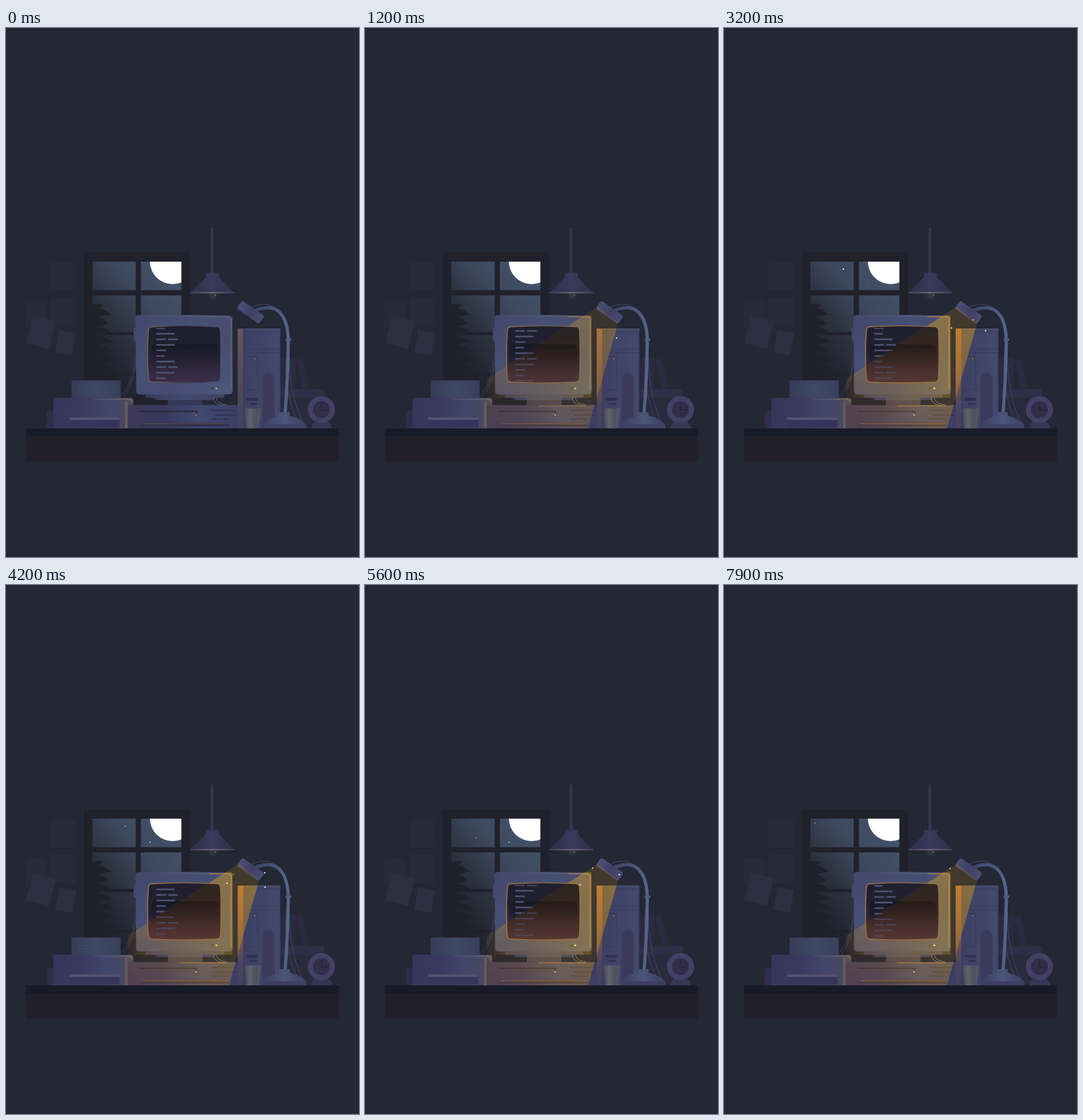
An HTML page that plays this animation: 611x917 px, repeating every 8000 ms.

```html
<!DOCTYPE html>
<html lang="en">
<head>
<meta charset="utf-8">
<title>Night desk</title>
<style>
html, body { margin: 0; height: 100%; overflow: hidden; background: #242734; }
svg { display: block; width: 100vw; height: 100vh; }
</style>
</head>
<body>
<svg viewBox="0 0 611 917" preserveAspectRatio="none">
<defs id="defs">
  <clipPath id="opening"><rect x="149.500" y="405" width="154" height="235"/></clipPath>
  <clipPath id="screenClip"><rect x="247" y="520" width="123" height="92.500"/></clipPath>
  <clipPath id="coneClip"><use href="#cone"/></clipPath>
  <clipPath id="objects"><path d="M224 498H392V641H340V654H400V694H211V654H280V641H224zM401 521H475V694H401z"/></clipPath>
  <path id="screen" d="M252 518Q308 514.500 365 518Q370.500 518.500 371 524Q373 566 371 607Q370.500 612.500 365 613.500Q308 616.500 252 613.500Q247 613 246.500 607Q243.500 566 246.500 524Q247 518.500 252 518Z"/>
  <path id="cone" d="M403 483L438 512L386 694H211V608L224 599.500Z"/>
  <path id="leads" d="M359 641C360 650 366 653 377 655M364 641C366 649 371 652 382 653"/>
</defs>

<rect width="611" height="917" fill="#242734"/>

<g id="papers" fill="#282a3a">
  <rect x="77" y="405.500" width="44.500" height="49.500"/>
  <rect x="77" y="467" width="44.500" height="50"/>
  <rect x="34" y="473" width="36.500" height="47"/>
  <rect x="40" y="503" width="41" height="49" fill="#2d2f40" transform="rotate(14 61 528)"/>
  <rect x="88.500" y="526" width="30" height="40" fill="#2d2f40" transform="rotate(10 104 546)"/>
</g>

<g id="window">
  <rect x="135" y="389" width="183.500" height="305" fill="#20212b"/>
  <g clip-path="url(#opening)">
    <rect x="149" y="404" width="155" height="236" fill="url(#sky)"/>
    <path id="tree" fill="#20212b"/>
    <circle cx="288.500" cy="404.500" r="39.500" fill="#fff"/>
    <path d="M229 404V640M149 459H304" stroke="#20212b" stroke-width="9"/>
    <path d="M149 529.700H304M149 600.500H304" stroke="#20212b" stroke-width="5.500"/>
  </g>
</g>
<g id="stars" fill="#fff"></g>

<g id="pendant">
  <circle cx="357.500" cy="459" r="12" fill="#2a2c39"/>
  <circle cx="358" cy="462" r="6" fill="#343744"/>
  <circle cx="362.500" cy="463" r="1" fill="#8b8a80"/>
  <rect x="354" y="346" width="5" height="80" fill="#363354"/>
  <path d="M346 424.500H368.500V432L395 459H319L346 432z" fill="url(#shade)"/>
  <rect x="319" y="457.500" width="76.500" height="2.500" fill="url(#rim)"/>
</g>

<g id="books" fill="#2b2a3e">
  <rect x="475" y="640" width="75" height="54" fill="#292a3b"/>
  <rect x="475" y="571.500" width="26.500" height="55"/>
  <rect x="508" y="573" width="12" height="53" transform="rotate(-14 514 600)"/>
  <rect x="475" y="626" width="75.500" height="15" fill="#2f2e46"/>
</g>

<g id="clock">
  <path d="M536 681H556L564 689V694H529V689z" fill="#363654"/>
  <circle cx="546" cy="661.500" r="23.500" fill="#434065"/>
  <circle cx="546" cy="661.500" r="14.700" fill="#322d49"/>
  <path d="M546 650V662H558" fill="none" stroke="#24233a" stroke-width="1.300"/>
</g>

<path id="cables" d="M224 566C222 600 213 622 198 640M225 578C222 608 214 626 203 641" fill="none" stroke="#41455f"/>

<g id="printer">
  <rect x="70.500" y="664" width="20" height="30" rx="4" fill="#302d4a"/>
  <rect x="113.500" y="611" width="85" height="31" fill="url(#tray)"/>
  <path d="M124 619H187M124 625H187M124 631H187" stroke="#47546d" opacity=".5"/>
  <path d="M82 694V645Q82 641 86 641H216Q220.500 641 220.500 646V694z" fill="url(#printerBody)"/>
  <path d="M150 643.500H213Q218 643.500 218 649" fill="none" stroke="url(#edge)" stroke-width="1.500"/>
  <rect x="206" y="646" width="4.500" height="48" fill="#766257" opacity=".7"/>
  <rect x="109.500" y="675" width="87" height="17.500" fill="#36345a"/>
  <rect x="109.500" y="675" width="87" height="4.500" fill="#55516f"/>
</g>

<g id="case">
  <rect x="211" y="653.500" width="191" height="44" rx="4" fill="url(#caseBody)"/>
  <path d="M215 655H384" stroke="url(#edge)" stroke-width="1.300"/>
  <path d="M231 664.500H330V669" fill="none" stroke="#24243a" stroke-width="2"/>
  <path d="M355 663H397M362 671H397M355 678H384" stroke="#303252" stroke-width="1.800"/>
  <circle cx="329" cy="670.800" r="1.300" fill="#c08a53"/>
  <path d="M236 684.500H383L388 691H231z" fill="#33314f"/>
  <path d="M236 686H384" stroke="#65525a"/>
</g>

<g id="monitor">
  <path d="M280 643H340V654H280z" fill="#353858"/>
  <path d="M242 634H378V641H364L358 645H262L256 641H242z" fill="url(#foot)"/>
  <use href="#leads" fill="none" stroke="#6d6c78"/>
  <rect x="221" y="519" width="6" height="23.500" rx="2" fill="#414768"/>
  <path d="M229 497.500Q308 496 387 498.500Q392 499 392 504L392.500 629Q392.500 634.500 387 635H231Q226 635 225.500 630L224 503Q224 498 229 497.500z" fill="url(#shell)"/>
  <path d="M230 500Q308 498.500 385 501Q389.500 501.500 389.500 506V626" fill="none" stroke="url(#edge)"/>
  <use href="#screen" fill="url(#glass)" stroke="url(#bezel)" stroke-width="1.600"/>
  <rect x="251" y="548.500" width="117" height="48" rx="8" fill="url(#reflect)"/>
  <g id="lines" clip-path="url(#screenClip)"></g>
  <circle cx="357.500" cy="624.500" r="1.400" fill="#25273c"/>
  <circle cx="364" cy="624.500" r="1.600" fill="#c9b45b"/>
</g>

<g id="tower">
  <rect x="401" y="521" width="74" height="173" fill="url(#towerBody)"/>
  <rect x="401" y="521" width="10" height="173" fill="url(#towerEdge)"/>
  <path d="M411 527H474V694M411 557H474M411 563H474M411 521V694M412 569H435.500V627H412" fill="none" stroke="#353858"/>
  <path d="M411 521.500H475" stroke="#535a79"/>
  <circle cx="430.500" cy="573.500" r="2.600" fill="#34304b"/>
  <circle cx="430.500" cy="573.500" r="1.400" fill="#aa775c"/>
  <path d="M416 641H436V646H416zM422 650H435V653H422z" fill="#303050"/>
  <path d="M444 694V608.500A10.500 10.500 0 0 1 465 608.500V694z" fill="#3b3a5d"/>
</g>

<g id="deskLamp" fill="none">
  <path d="M491 545C488 600 496 650 516 688M486 560C481 610 490 660 508 684M425 484C446 473 466 481 478 495" stroke="#454c6b"/>
  <path d="M483 668C486 630 488 590 488.500 545C489 508 476 484 452 485C443 485.500 437 487 431 490" stroke="url(#arm)" stroke-width="5.500"/>
  <rect x="484" y="538" width="10" height="4.500" rx="1.500" fill="#4d5a80"/>
  <path d="M473 666H491V672Q513 678 520 688H444Q451 677 473 672z" fill="url(#lampBase)"/>
  <rect x="443.500" y="687" width="76.500" height="7" rx="1" fill="#3c3f62"/>
  <rect x="400" y="484" width="47" height="17" rx="4" fill="url(#head)" transform="rotate(35 423 492.500)"/>
</g>

<g id="light">
  <use href="#cone" fill="url(#beam)"/>
  <use href="#cone" fill="url(#warm)" clip-path="url(#objects)"/>
  <g clip-path="url(#coneClip)">
    <use href="#screen" fill="url(#litGlass)"/>
    <rect x="251" y="548.500" width="117" height="48" rx="8" fill="url(#litReflect)"/>
    <use href="#lines" opacity=".6"/>
  </g>
  <rect x="401" y="521" width="10" height="130" fill="url(#warmEdge)"/>
  <g fill="none" stroke="#c98a3c">
    <path d="M352 500.500H385Q389.500 501 389.500 506V628" stroke-width="1.700" opacity=".8"/>
    <use href="#screen" stroke-width="1.400" opacity=".55"/>
    <path d="M300 655H384" stroke-width="1.400" opacity=".6"/>
    <path d="M236 686H384" opacity=".35"/>
    <use href="#leads" opacity=".5"/>
  </g>
  <circle cx="364" cy="624.500" r="1.600" fill="#ffd84f"/>
  <circle cx="329" cy="670.800" r="1.300" fill="#ffad42"/>
</g>

<path id="cup" d="M413 659.500H441.500L437.500 694H417z" fill="url(#cupFill)"/>

<rect x="34.500" y="694" width="542" height="14.500" fill="#181b27"/>
<rect x="34.500" y="708" width="542" height="44" fill="#21202a"/>
<g id="motes" fill="#fff3da"></g>
</svg>

<script>
const LOOP = 8000, ROW_MS = 800, ROW = 9.65;
const $ = id => document.getElementById(id);
const clamp = v => Math.max(0, Math.min(1, v));

function add(parent, tag, attrs) {
  const el = document.createElementNS('http://www.w3.org/2000/svg', tag);
  for (const k in attrs) el.setAttribute(k, attrs[k]);
  return parent.appendChild(el);
}

// Evenly spaced stops; a stop may be "colour opacity".
function gradient(id, dir, ...stops) {
  const [x1, y1, x2, y2] = dir;
  const g = add($('defs'), 'linearGradient', { id, x1, y1, x2, y2 });
  stops.forEach((s, i) => {
    const [color, alpha = 1] = s.split(' ');
    add(g, 'stop', { offset: i / (stops.length - 1), 'stop-color': color, 'stop-opacity': alpha });
  });
}

const ACROSS = [0, 0, 1, 0], DOWN = [0, 0, 0, 1], SLANT = [0, 0, 1, 1], FROM_LAMP = [1, 0, 0.1, 1];
gradient('sky', [0.9, 0.15, 0.3, 0.9], '#42526a', '#3c485c', '#2c313e', '#20222c');
gradient('shade', ACROSS, '#312f4b', '#3b385b', '#302f4a');
gradient('rim', ACROSS, '#413e5e', '#6a6270', '#413e5e');
gradient('tray', ACROSS, '#363b56', '#3d4864', '#383f5b');
gradient('printerBody', ACROSS, '#38345a', '#3a395d', '#41466a', '#4c4a5e');
gradient('edge', ACROSS, '#4a4c6a', '#566078', '#85704f');
gradient('caseBody', ACROSS, '#3d3855', '#39395d', '#404970', '#3b3e63');
gradient('foot', ACROSS, '#383b5c', '#424c6e', '#3c4264');
gradient('shell', SLANT, '#43476b', '#465073', '#454d72', '#4d597a');
gradient('glass', DOWN, '#1f1f2f', '#20202f', '#2c263b', '#3b2e49');
gradient('bezel', ACROSS, '#7d6258', '#3c3b50', '#4d536c');
gradient('reflect', DOWN, '#171823 .95', '#1d1c2a .55', '#2b2438 0');
gradient('litGlass', DOWN, '#2b2521', '#33261f', '#432c28', '#553633');
gradient('litReflect', DOWN, '#211a18 .9', '#2c1f1d .5', '#432c28 0');
gradient('towerBody', ACROSS, '#3c3d61', '#404467', '#434a6d');
gradient('towerEdge', DOWN, '#66545b', '#56495b', '#454060');
gradient('arm', ACROSS, '#3f466a', '#465276', '#53658a');
gradient('lampBase', ACROSS, '#3c3f63', '#4a5679', '#3c3f63');
gradient('head', ACROSS, '#4a5076', '#403f64', '#484d72');
gradient('cupFill', ACROSS, '#4a4c5b', '#606268', '#4c5060', '#575962');
gradient('beam', FROM_LAMP, '#f2a500 .15', '#f2a500 .13', '#e58a20 .06');
gradient('warm', FROM_LAMP, '#f0b010 .32', '#d9a020 .27', '#c07828 .08');
gradient('warmEdge', DOWN, '#d8822c .6', '#c47630 .5', '#a66a40 .05');

// Pine: drooping tiers that widen towards the ground.
let pine = 'M149 480Q158 476 168 480';
for (let y = 486; y < 620; y += 16) {
  const reach = 178 + (y - 486) * 0.13 + 4 * Math.sin(y);
  pine += `L160 ${y}Q${reach - 8} ${y + 2} ${reach} ${y + 11}L164 ${y + 14}`;
}
$('tree').setAttribute('d', pine + 'V640H149Z');

// Code rows repeat every five: widths of the bars in each row.
const CODE = [[32], [17, 17], [32], [17], [15]];
const code = add($('lines'), 'g', {});
for (let i = -1; i < 21; i++) {
  CODE[(i + 5) % 5].forEach((width, k) =>
    add(code, 'rect', { x: 260 + k * 20.5, y: 528.6 + i * ROW, width, height: 2.8, rx: 1.2, fill: '#4e5272' }));
}

// Rises to 1 and falls back to 0, flat for the middle half.
const pulse = (t, mid, reach) => clamp(2 - 2 * Math.abs(t - mid) / reach);

const glow = t => (1 - pulse(t, 0, 600)) * (1 - 0.45 * pulse(t, 1700, 700)) * (1 - pulse(t, 4850, 350));

const stars = [
  { cx: 206.5, cy: 418, r: 1.2, mid: 2900, reach: 1700, peak: 1 },
  { cx: 249.5, cy: 445.5, r: 0.9, mid: 4700, reach: 1700, peak: 0.9 },
  { cx: 192, cy: 438.5, r: 0.9, mid: 5700, reach: 1100, peak: 0.5 },
  { cx: 157.5, cy: 412.5, r: 0.9, mid: 7700, reach: 1600, peak: 0.55 }
];
for (const s of stars) s.el = add($('stars'), 'circle', { cx: s.cx, cy: s.cy, r: s.r });

// Motes drift along waypoints that are "step" ms apart.
const motes = [
  { from: 800, step: 900, path: [[421, 541], [453, 533], [458, 528], [450, 523], [448, 524], [448, 524]] },
  { from: 3200, step: 1600, path: [[431, 506], [458, 495], [422, 509], [389, 490]] },
  { from: 1700, step: 1600, path: [[376, 491], [395, 522], [373, 513], [372, 528]] },
  { from: 4300, step: 1400, path: [[394, 502], [394, 490]] }
];
for (const m of motes) m.el = add($('motes'), 'circle', { r: 1.25 });

function drawMote({ el, from, step, path }, t) {
  const last = path.length - 1, age = t - from, left = last * step - age;
  const u = Math.max(0, Math.min(last, age / step));
  const i = Math.min(last - 1, Math.floor(u)), [a, b] = [path[i], path[i + 1]];
  const mix = k => a[k] + (b[k] - a[k]) * (u - i);
  el.setAttribute('cx', mix(0));
  el.setAttribute('cy', mix(1));
  el.setAttribute('opacity', clamp(0.6 + Math.min(age, left) / 500));
}

function draw(t) {
  $('light').setAttribute('opacity', glow(t));
  code.setAttribute('transform', `translate(0 ${-t / ROW_MS * ROW})`);
  for (const s of stars) s.el.setAttribute('opacity', s.peak * pulse(t, s.mid, s.reach));
  for (const m of motes) drawMote(m, t);
}

const start = performance.now();
function tick() {
  draw((performance.now() - start) % LOOP);
  requestAnimationFrame(tick);
}
draw(0);
requestAnimationFrame(tick);
</script>
</body>
</html>
```
